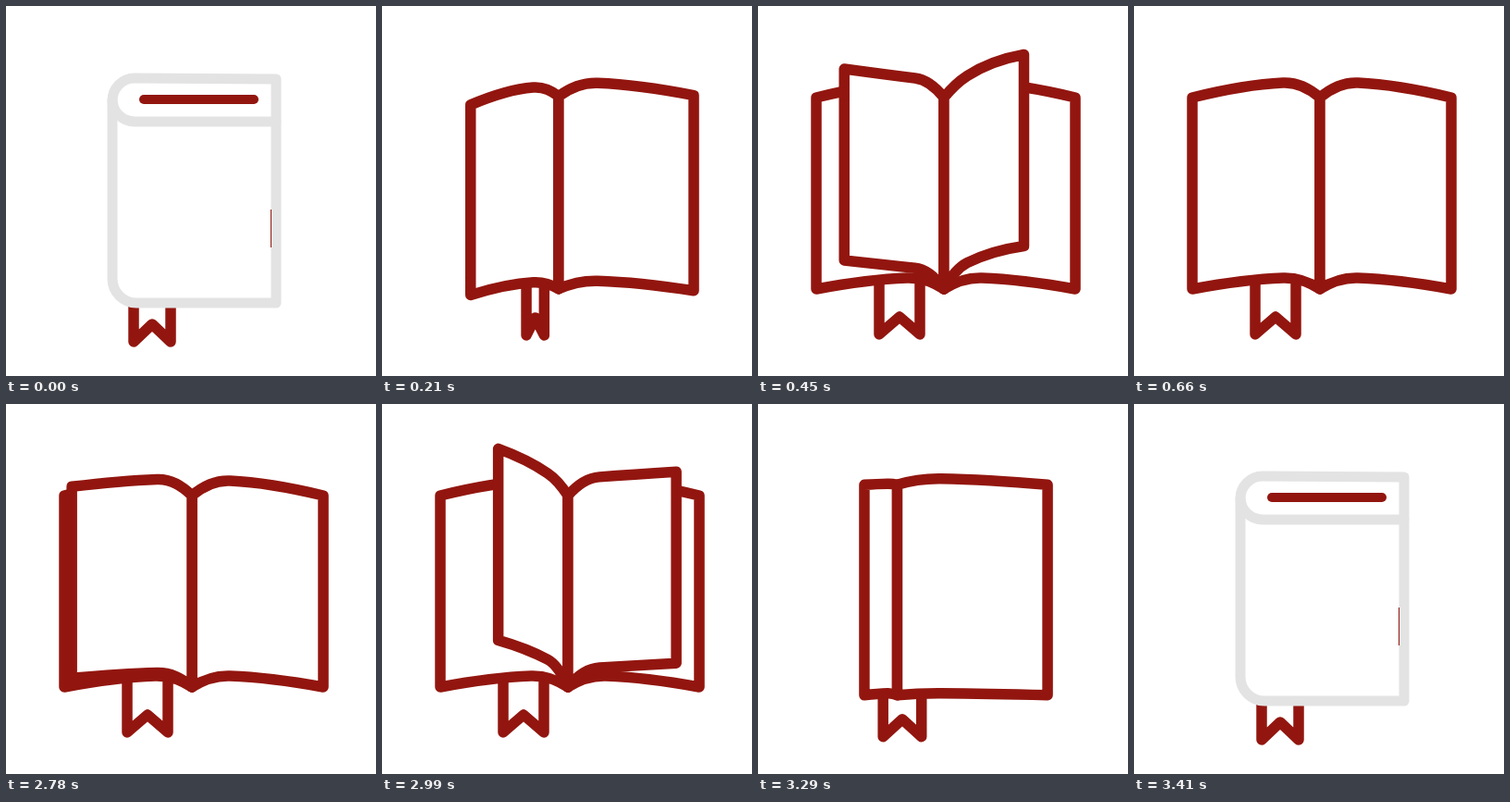
Animation, 400 px wide and 400 px high, one loop 4440 ms. Source, as an HTML page:

```html
<!DOCTYPE html>
<html lang="en">
<head>
<meta charset="utf-8">
<title>Opening book</title>
<style>
  html, body { margin: 0; width: 100%; height: 100%; overflow: hidden; background: #fff; }
  svg { display: block; width: 100%; height: 100%; }
  path { fill: #fff; stroke: #92160f; stroke-width: 11.5; stroke-linejoin: round; stroke-linecap: round; }
  #cover .grey { stroke: #e3e3e3; stroke-width: 11; }
  #cover .bar { stroke-width: 10; }
  #cover .sliver { stroke-width: 1; stroke-linecap: butt; }
</style>
</head>
<body>
<svg viewBox="0 0 400 400">
  <path id="ribbon"/>
  <path id="left"/>
  <path id="right"/>
  <path id="page1"/>
  <path id="page2"/>
  <g id="cover">
    <path class="grey" d="M292 79L139 78A24 24 0 0 0 115 102V295A26 26 0 0 0 141 321H292Z"/>
    <path class="grey" fill-opacity="0" d="M115 102A24 24 0 0 0 139 125H292"/>
    <path class="bar" d="M149 101H268"/>
    <path class="sliver" d="M286.5 220V261"/>
  </g>
</svg>
<script>
const STEP = 30, LOOP = 4440, CLOSE_AT = 2780, LAST = 22;
const OPEN_STEPS = 9, TURN_STEPS = 9.8, PAGE_DELAY = 5;
const LEFT = 63, SPINE = 201, RIGHT = 343, TOP = 99, BOTTOM = 306;

const setPath = (id, d) => document.getElementById(id).setAttribute("d", d);
const mix = (a, b, k) => a + (b - a) * k;
const smooth = k => k * k * (3 - 2 * k);

// Points of a curved page edge, from the spine outwards.
function edge(x, y, outX, outY, arch, gain) {
  const w = outX - x, rise = y - outY;
  const crest = y - arch - gain * rise;
  const bend = 0.12 + Math.max(rise, 0) * (w > 0 ? 0.013 : 0.009);
  const outer = mix(crest, outY, bend);
  const inner = crest + (crest - outer) / 2;
  return [[x, y], [x + 0.14 * w, inner], [x + 0.29 * w, crest], [x + 0.59 * w, outer], [outX, outY]];
}

function leaf(x, top, bottom, outX, outTop, outBottom, archTop, archBottom) {
  const t = edge(x, top, outX, outTop, archTop, 0.16);
  const b = edge(x, bottom, outX, outBottom, archBottom, 0.35);
  return `M${t[0]}Q${t[1]} ${t[2]}Q${t[3]} ${t[4]}L${b[4]}Q${b[3]} ${b[2]}Q${b[1]} ${b[0]}Z`;
}

function turningPage(stepsLeft) {
  if (stepsLeft <= 0 || stepsLeft >= TURN_STEPS) return "";
  const x = mix(LEFT, RIGHT, smooth(stepsLeft / TURN_STEPS));
  const reach = Math.abs(x - SPINE) / (x < SPINE ? SPINE - LEFT : RIGHT - SPINE);
  const rise = 62 * (1 - reach ** 2.8);
  return leaf(SPINE, TOP, BOTTOM, x, TOP - rise, BOTTOM - rise, 16, 12);
}

function drawBook(step) {
  const k = (1 - Math.cos(Math.PI * Math.min(1, step / OPEN_STEPS))) / 2;
  const swing = k ** 8;                    // the left half follows late
  const tilt = 4 * swing * (1 - swing);    // strongest halfway through the swing
  const spine = mix(115, SPINE, k);
  const top = mix(79, TOP, k), bottom = mix(321, BOTTOM, k);
  const spineBottom = bottom - 2 * tilt, archBottom = 12 * k * k;

  setPath("left", step ? leaf(spine, top + tilt, spineBottom,
    mix(115, LEFT, swing), top + 11 * tilt, bottom + 5 * tilt, 16 * k ** 3, archBottom) : "");
  setPath("right", step ? leaf(spine, top + tilt, spineBottom,
    mix(292, RIGHT, k), top, bottom, 16 * k, archBottom) : "");

  const a = mix(138, 131, k) + 26 * tilt, b = mix(178, 175, k), end = mix(363, 355, k);
  setPath("ribbon", `M${a} 301V${end}L${(a + b) / 2} ${end - 19}L${b} ${end}V301`);
}

function draw(step) {
  drawBook(step);
  setPath("page1", turningPage(LAST - PAGE_DELAY - step));
  setPath("page2", turningPage(LAST - step));
  const fold = Math.max(0, 1 - step / 3);
  const cover = document.getElementById("cover");
  cover.style.display = fold ? "" : "none";
  cover.setAttribute("transform", `translate(115) scale(${fold} 1) translate(-115)`);
}

function stepAt(t) {
  return t < CLOSE_AT
    ? Math.min(LAST, Math.floor(t / STEP))
    : Math.max(0, LAST - 1 - Math.floor((t - CLOSE_AT) / STEP));
}

const start = performance.now();
function tick() {
  draw(stepAt((performance.now() - start) % LOOP));
  requestAnimationFrame(tick);
}
tick();
</script>
</body>
</html>
```
